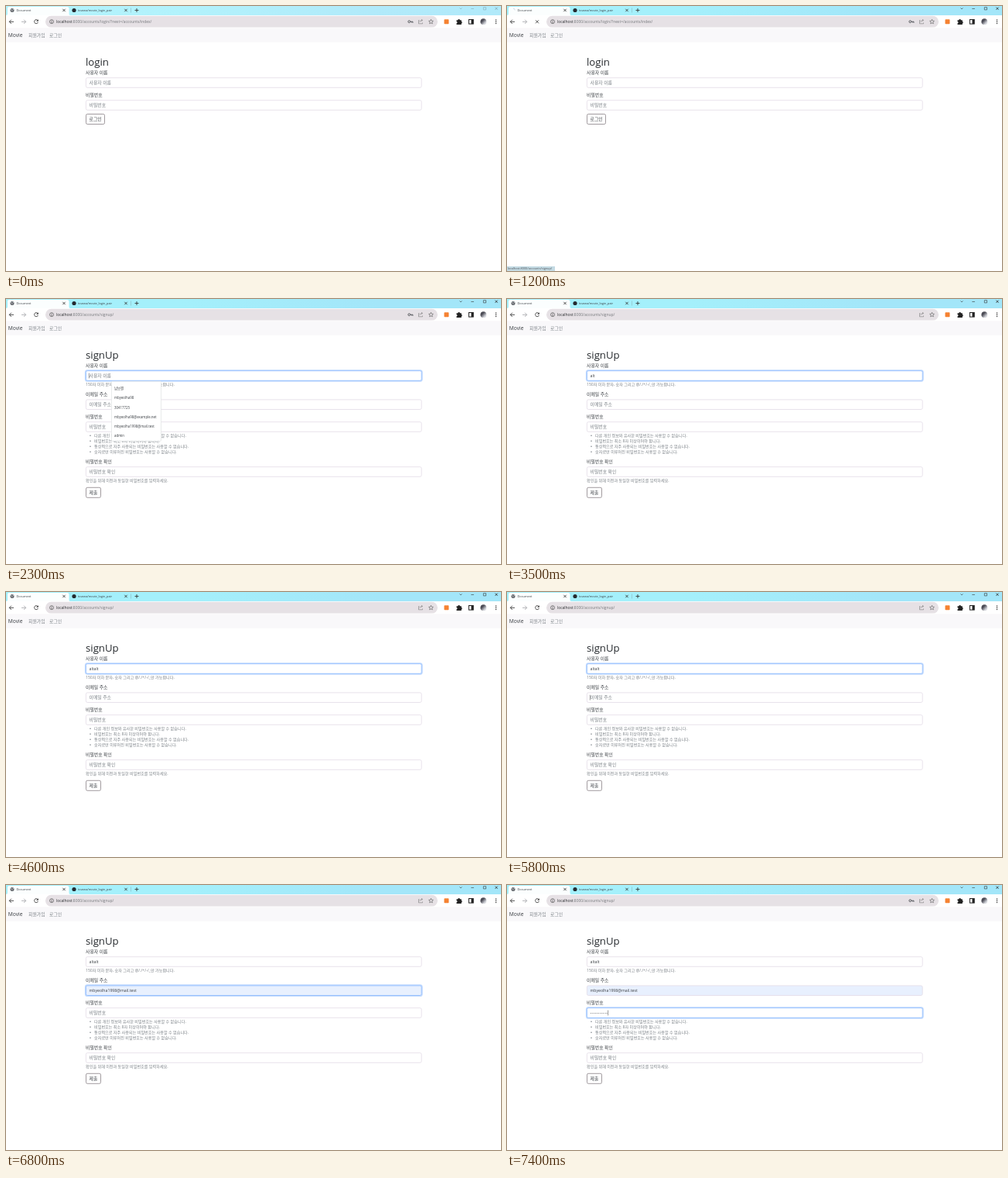
An HTML page for the animation above (8 s loop, 640 by 342 pixels).

```html
<!DOCTYPE html>
<html lang="ko">
<head>
<meta charset="utf-8">
<title>Sign up</title>
<style>
html, body { margin: 0; height: 100%; overflow: hidden; background: #fff; }
svg { display: block; width: 100vw; height: 100vh; }
text { font-family: "Open Sans", "Noto Sans CJK KR", "Noto Sans CJK", sans-serif; white-space: pre; }
.line { fill: none; stroke: #333; stroke-width: .85; }
#passValue { letter-spacing: .5px; }
</style>
</head>
<body>
<svg id="stage" viewBox="0 0 640 342"></svg>
<script>
const LOOP = 8000;
const INK = '#3a3e43', GREY = '#7b8187';
const stage = document.getElementById('stage');
const $ = id => document.getElementById(id);

// y is the vertical middle of the line
const text = (x, y, s, size = 5.85, fill = INK, attrs = '') =>
  `<text x="${x}" y="${y + size * .36}" font-size="${size}" fill="${fill}" ${attrs}>${s}</text>`;
const rect = (x, y, w, h, fill, attrs = '') =>
  `<rect x="${x}" y="${y}" width="${w}" height="${h}" fill="${fill}" ${attrs}/>`;
const line = (d, attrs = '') => `<path class="line" d="${d}" ${attrs}/>`;
const dot = (x, y, r, fill, attrs = '') => `<circle cx="${x}" cy="${y}" r="${r}" fill="${fill}" ${attrs}/>`;
const group = (id, body) => `<g id="${id}">${body}</g>`;
const cross = (x, y, r) => line(`M${x - r} ${y - r}l${2 * r} ${2 * r}m0 ${-2 * r}l${-2 * r} ${2 * r}`);
const gradient = (id, y2, a, b) =>
  `<linearGradient id="${id}" x2="1" y2="${y2}"><stop offset=".35" stop-color="${a}"/><stop offset=".75" stop-color="${b}"/></linearGradient>`;

const heading = s => text(103, 72, s, 13.2, '#25292d');
const help = (y, s, x = 103) => text(x, y, s, 5.12, GREY);
const button = (y, w, s) =>
  rect(103.5, y, w, 13, '#fff', 'rx="1.8" stroke="#8a8287" stroke-width=".8"') + text(107.5, y + 6.5, s);

function field(id, y, label) {
  return text(103, y - 13, label) +
    rect(102.6, y - 7.1, 435.4, 14.2, 'none', `id="${id}Glow" rx="2.6" stroke="#c2dafe" stroke-width="1.5"`) +
    rect(103.4, y - 6.3, 433.8, 12.6, '#fff', `id="${id}Box" rx="1.9" stroke="#e2dbe6" stroke-width=".8"`) +
    text(107.5, y, label, 5.85, GREY, `id="${id}Hint"`) +
    text(107.5, y, '', 5.2, INK, `id="${id}Value"`) +
    line(`M0 ${y - 3.4}v6.8`, `id="${id}Caret" style="stroke-width:.5"`);
}

function popup(id, y, items) {
  return group(id,
    rect(136.5, y, 64, 77, '#fff', 'rx="1" stroke="#e0e3e2" stroke-width=".7"') +
    rect(137, y + 3.4, 63, 12.2, '#e8eaed', `id="${id}Row"`) +
    items.map((s, i) => text(140, y + 9.3 + 12.2 * i, s, 4.4)).join(''));
}

const email = 'mbyeolha1998@mail.test';
const chrome =
  gradient('sky', 0, '#a4f0fb', '#a3e6f9') + gradient('face', 1, '#4b4b55', '#d4d6dc') +
  rect(0, 0, 640, 12, 'url(#sky)', 'id="strip"') +
  '<path d="M0 12Q2 12 2 10V3Q2 1 4 1H79Q81.500 1 81.500 3V10Q81.500 12 83 12Z" fill="#fbfefe"/>' +
  group('globe', dot(8, 5.5, 2.5, '#5f6368') + line('M6.300 4.600l1.500 .6l.3 1.500M8.800 3.600l1 1.500', 'style="stroke:#fff;stroke-width:.6"')) +
  group('spinner', line('M8 3.200A2.300 2.300 0 0 1 10.300 5.500', 'style="stroke:#b9c6d8;stroke-width:.6"')) +
  text(13.5, 5.5, 'Document', 3.9) + cross(75, 5.5, 1.7) +
  dot(88, 5.5, 2.6, '#24292f') + text(93, 5.5, 'tovana/movie_login_pair', 3.9) + cross(155, 5.5, 1.7) +
  line('M161.500 2.500v6', 'style="stroke:#8bb8c0;stroke-width:.6"') + line('M166.500 5.500h5m-2.500 -2.500v5') +
  group('controls', line('M586.500 2.500l1.500 1.500l1.500 -1.500M601.300 3.500h3.600M617.300 1.700h3.200v3.200h-3.200z', 'style="stroke-width:.6"') + cross(634, 3.3, 1.6)) +
  line('M10 20.300H4.300m2.600 -2.600l-2.600 2.600l2.600 2.600') +
  line('M20 20.300h5.700m-2.600 -2.600l2.600 2.600l-2.600 2.600', 'style="stroke:#a4a7aa"') +
  group('reload', line('M41 18.600A2.500 2.500 0 1 0 41.400 21') + '<path d="M41.800 17.200v2.600h-2.600z" fill="#333"/>') +
  group('stop', cross(39, 20.3, 2)) +
  rect(51, 12.8, 507, 14.8, '#e6e1e5', 'rx="7.400"') +
  line('M59 19.800v2m0 -3.400v.7', 'style="stroke-width:.7"') + dot(59, 20.2, 2.5, 'none', 'stroke="#555" stroke-width=".7"') +
  text(65, 20.2, '<tspan fill="#25282b">localhost</tspan><tspan id="path"></tspan>', 4.92, '#74777b') +
  group('key', dot(521.3, 20.2, 1.4, 'none', 'stroke="#4b4f53" stroke-width=".9"') + line('M522.700 20.200h3.300v1.600m-1.400 -1.600v1.300', 'style="stroke:#4b4f53"')) +
  line('M534.500 18.500h-1v4.300h5v-1.300M534.800 20.800q.5 -2.400 3.500 -2.400m-1.300 -1.300l1.500 1.300l-1.500 1.300', 'style="stroke:#777;stroke-width:.6"') +
  line('M549.500 17.300l.9 1.900l2 .2l-1.500 1.400l.4 2l-1.800 -1l-1.800 1l.4 -2l-1.500 -1.400l2 -.2z', 'style="stroke:#555;stroke-width:.6"') +
  rect(566.5, 17.3, 6, 6, '#f58232', 'rx=".8"') +
  '<path d="M582.500 18.300h1.800a1.300 1.300 0 0 1 2.600 0h1.900v1.800a1.300 1.300 0 0 1 0 2.500v1.400h-6.300v-1.800a1 1 0 0 0 0 -2z" fill="#222"/>' +
  rect(598.4, 17.5, 5.8, 5.6, '#fff', 'stroke="#222" stroke-width="1"') + rect(601.5, 17.5, 2.7, 5.6, '#222') +
  dot(617.3, 20.2, 3.9, 'url(#face)') +
  [18, 20.2, 22.4].map(y => dot(633.5, y, .75, '#333')).join('') +
  rect(0, 28.3, 640, 18.5, '#f9f8fa') +
  text(2.7, 38, 'Movie', 6.7) + text(29, 38, '회원가입', 5.85, GREY) + text(56, 38, '로그인', 5.85, GREY);

const rules = [
  '다른 개인 정보와 유사한 비밀번호는 사용할 수 없습니다.',
  '비밀번호는 최소 8자 이상이어야 합니다.',
  '통상적으로 자주 사용되는 비밀번호는 사용할 수 없습니다.',
  '숫자로만 이루어진 비밀번호는 사용할 수 없습니다.'
];

stage.innerHTML = chrome +
  group('login', heading('login') + field('logName', 99, '사용자 이름') +
    field('logPass', 128, '비밀번호') + button(139.5, 24, '로그인')) +
  group('signup', heading('signUp') +
    field('name', 99, '사용자 이름') + help(110.5, '150자 이하 문자, 숫자 그리고 @/./+/-/_만 가능합니다.') +
    field('mail', 136.2, '이메일 주소') + field('pass', 165, '비밀번호') +
    rules.map((s, i) => dot(109, 176.2 + 7 * i, .8, GREY) + help(176.2 + 7 * i, s, 114)).join('') +
    field('again', 223, '비밀번호 확인') + help(234.3, '확인을 위해 이전과 동일한 비밀번호를 입력하세요.') +
    button(243.3, 19, '제출') +
    popup('names', 106.3, ['남보결', 'mbyeolha98', '30417725', 'mbyeolha98@example.net', email, 'admin']) +
    popup('mails', 143.3, [email, 'mbyeolha98@note.test', 'mbyeolha98@box.test', 'oro315b@post.test', 'mbyeolha98@example.net', 'ffff@post.test'])) +
  group('status', rect(0, 336, 62, 6, '#c4dbe4') + text(0.7, 339.1, 'localhost:8000/accounts/signup/', 3.8, '#4e555c'));

$('passValue').setAttribute('font-size', 4.2);

const show = (id, on) => $(id).style.display = on ? '' : 'none';
const clamp = v => Math.min(1, Math.max(0, v));
const ease = v => { v = clamp(v); return v * v * (3 - 2 * v); };
const between = (t, a, b) => t >= a && t < b;
// focus ring fades in and out over 150 ms
const focus = (t, a, b) => ease((t - a) / 150) - ease((t - b) / 150);
const mix = (a, b, k) => `rgb(${a.map((v, i) => Math.round(v + (b[i] - v) * k))})`;

function setField(id, value, glow, caret, fill = '#fff') {
  $(id + 'Glow').style.opacity = glow;
  $(id + 'Box').setAttribute('stroke', mix([226, 219, 230], [134, 183, 254], glow));
  $(id + 'Box').setAttribute('fill', fill);
  show(id + 'Hint', !value);
  $(id + 'Value').textContent = value;
  show(id + 'Caret', caret);
  if (caret) {
    const x = 107.4 + (value ? $(id + 'Value').getComputedTextLength() + .4 : 0);
    $(id + 'Caret').setAttribute('transform', `translate(${x})`);
  }
}

const keys = [2700, 2800, 3000, 3800, 4000, 4100];
const idle = ['logName', 'logPass', 'again'];

function draw(t) {
  const loaded = t >= 1300, active = t >= 700, busy = between(t, 1000, 1400);
  $('strip').style.opacity = active ? 1 : .85;
  $('controls').style.opacity = active ? 1 : .35;
  show('globe', !busy);
  show('spinner', busy);
  $('spinner').setAttribute('transform', `rotate(${(t - 1200) * .36} 8 5.5)`);
  show('reload', !busy);
  show('stop', busy);
  $('path').textContent = ':8000/accounts/' + (loaded ? 'signup/' : 'login/?next=/accounts/index/');
  show('key', !between(t, 2700, 7400));
  show('login', !loaded);
  show('signup', loaded);
  $('status').style.opacity = clamp((t - 750) / 100) - clamp((t - 1700) / 200);

  idle.forEach(id => setField(id, '', 0, false));
  const typed = keys.filter(k => t >= k);
  const lastKey = typed.length ? typed[typed.length - 1] : 1300;
  const nameCaret = between(t, 1300, 4600) && (t - lastKey) % 1000 < 500;
  setField('name', 'altalt'.slice(0, typed.length), focus(t, 1300, 5800), nameCaret);
  const filled = t >= 6400;
  setField('mail', filled ? email : '', focus(t, 5800, 7000), between(t, 5800, 6300), filled ? '#e8f0fe' : '#fff');
  setField('pass', t >= 7400 ? '•'.repeat(11) : '', focus(t, 7000, 9000), t >= 7000);

  show('names', between(t, 1900, 2700));
  show('namesRow', false);
  show('mails', between(t, 6000, 6800));
  show('mailsRow', filled);
}

let start;
function tick(now) {
  start ??= now;
  draw((now - start) % LOOP);
  requestAnimationFrame(tick);
}
draw(0);
requestAnimationFrame(tick);
</script>
</body>
</html>
```
